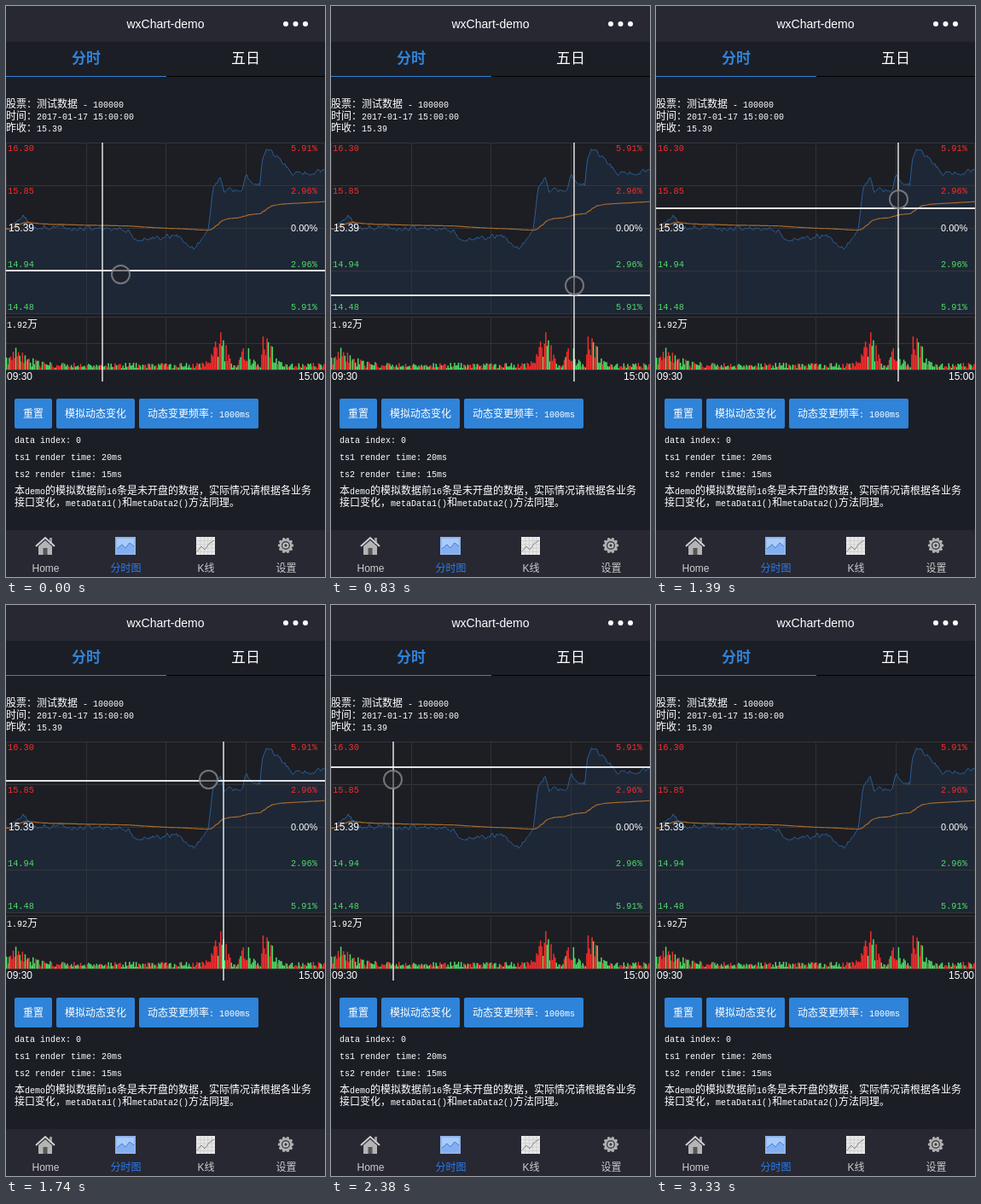
An HTML page with a canvas that plays this animation: 374 px wide and 669 px high, repeating every 3980 ms.

```html
<!DOCTYPE html>
<html lang="zh">
<head>
<meta charset="utf-8">
<title>wxChart-demo</title>
<style>
html, body { margin: 0; width: 374px; height: 669px; overflow: hidden; background: #1c1e26; }
canvas, div { position: absolute; left: 0; top: 0; }
#vert { top: 160px; width: 2px; height: 280px; background: rgba(255,255,255,.65); }
#horiz { width: 374px; height: 2px; background: rgba(255,255,255,.87); }
#touch { width: 19px; height: 19px; border: 2px solid rgba(150,150,150,.72); border-radius: 50%; background: rgba(30,32,40,.5); }
</style>
</head>
<body>
<canvas id="stage" width="374" height="669"></canvas>
<div id="vert"></div><div id="horiz"></div><div id="touch"></div>
<script>
const $ = id => document.getElementById(id);
const g = $('stage').getContext('2d');
const W = 374, BLUE = '#2f83d8', RED = '#f72c2c', GREEN = '#4fdc68', BAR = '#272832';
const SANS = '"Liberation Sans", "Noto Sans CJK SC", "Noto Sans CJK", sans-serif';
const CJK = '"Noto Sans CJK SC", "Noto Sans CJK", sans-serif';
const MONO = '"Liberation Mono", monospace';

let seed = 11;
const rnd = () => (seed = (seed * 16807) % 2147483647) / 2147483647;

// Linear interpolation in rows of [position, ...values].
function at(rows, p) {
  const i = rows.findIndex(r => r[0] >= p);
  if (i < 0) return rows[rows.length - 1].slice(1);
  if (!i) return rows[0].slice(1);
  const a = rows[i - 1], b = rows[i], k = (p - a[0]) / (b[0] - a[0]);
  return a.slice(1).map((v, j) => v + (b[j + 1] - v) * k);
}

function rect(x, y, w, h, color) {
  g.fillStyle = color;
  g.fillRect(x, y, w, h);
}

function text(s, x, y, font, color = '#fff', align = 'left') {
  g.font = font;
  g.fillStyle = color;
  g.textAlign = align;
  g.fillText(s, x, y);
}

// Full-width glyphs at 12px, half-width ones at 6px advance.
function mixed(s, x, y) {
  for (const run of s.match(/[\x20-\x7e]+|[^\x20-\x7e]+/g)) {
    const half = run < '\x7f';
    text(run, x, y, half ? '10px ' + MONO : '12px ' + CJK);
    x += run.length * (half ? 6 : 12);
  }
}

function path(points, color, width = 1) {
  g.beginPath();
  points.forEach(p => g.lineTo(...p));
  g.strokeStyle = color;
  g.lineWidth = width;
  g.stroke();
}

function shape(points, color) {
  g.beginPath();
  points.forEach(p => g.lineTo(...p));
  g.fillStyle = color;
  g.fill();
}

function disc(x, y, r, color) {
  g.beginPath();
  g.arc(x, y, r, 0, 7);
  g.fillStyle = color;
  g.fill();
}

function header() {
  rect(0, 0, W, 42, BAR);
  text('wxChart-demo', 187, 26, '14px ' + SANS, '#fff', 'center');
  for (let i = 0; i < 3; i++) disc(328 + i * 11.5, 21, 3, '#fff');
  text('分时', 94, 67, 'bold 17px ' + CJK, BLUE, 'center');
  text('五日', 281, 67, '17px ' + CJK, '#fff', 'center');
  rect(0, 82, 188, 1, BLUE);
  rect(188, 82, 186, 1, '#000');
  ['股票：测试数据 - 100000', '时间：2017-01-17 15:00:00', '昨收：15.39']
    .forEach((s, i) => mixed(s, 0, 119 + i * 14));
}

// Turning points of the price curve.
const PRICE = [
  [0, 264], [20, 248], [30, 258], [144, 262], [150, 274], [200, 269], [220, 286], [237, 262], [243, 213],
  [251, 201], [256, 217], [276, 216], [281, 201], [298, 209], [300, 180], [305, 166], [322, 179], [335, 196], [374, 193]
];
// Trading bursts: centre, spread, height.
const SURGES = [[8, 24, 19], [12, .7, 45], [250, 9, 44], [281, 7, 30], [303, 3, 56], [312, 7, 24]];

// One trade sample per 1.55px; the average is weighted by volume.
function trades() {
  const list = [];
  let drift = 0, money = 0, total = 0;
  for (let x = 0; x <= W; x += 1.55) {
    drift = drift * .6 + (rnd() - .5) * 5;
    const price = at(PRICE, x)[0] + drift;
    const surge = SURGES.reduce((sum, [c, w, h]) => sum + h * Math.exp(-(((x - c) / w) ** 2)), 8);
    const volume = Math.min(61, surge * (.2 + .8 * rnd()));
    money += price * volume;
    total += volume;
    list.push({ x, price, volume, mean: money / total });
  }
  return list;
}

function chart() {
  rect(0, 160, W, 200, '#1c1e23');
  rect(0, 365, W, 61, '#1c1e23');
  const data = trades();
  const line = data.map(d => [d.x, d.price]);
  shape([...line, [W, line[line.length - 1][1]], [W, 360], [0, 360]], '#1e2735');
  for (let i = 0; i < 5; i++) {
    rect(0, 160 + i * 50, W, 1, '#34353a');
    const x = Math.min(373, Math.round(i * 93.5));
    rect(x, 160, 1, 200, '#303238');
    rect(x, 365, 1, 61, '#303238');
  }
  for (const y of [364, 395, 426]) rect(0, y, W, 1, '#34353a');
  path(line, '#2b5d98');
  path(data.map(d => [d.x, d.mean]), '#a4692f', 1.2);
  data.forEach((d, i) => {
    const rising = i && d.price < data[i - 1].price;
    rect(d.x, 426 - d.volume, 1.5, d.volume, rising ? RED : GREEN);
  });

  const mono = '10.3px ' + MONO;
  [['16.30', '5.91%', 170, RED], ['15.85', '2.96%', 220, RED],
   ['14.94', '2.96%', 306, GREEN], ['14.48', '5.91%', 356, GREEN]].forEach(([a, b, y, color]) => {
    text(a, 2, y, mono, color);
    text(b, 334, y, mono, color);
  });
  text('15.39', 3, 264, '12px ' + SANS);
  text('0.00%', 334, 264, '11px ' + SANS);
  mixed('1.92万', 1, 377);
  text('09:30', 1, 438, '12px ' + SANS);
  text('15:00', 373, 438, '12px ' + SANS, '#fff', 'right');
}

function controls() {
  [[10, 44, '重置'], [59, 92, '模拟动态变化'], [156, 140, '动态变更频率: 1000ms']].forEach(([x, w, s]) => {
    g.beginPath();
    g.roundRect(x, 460, w, 35, 2);
    g.fillStyle = BLUE;
    g.fill();
    mixed(s, x + 10, 482);
  });
  ['data index: 0', 'ts1 render time: 20ms', 'ts2 render time: 15ms',
   '本demo的模拟数据前16条是未开盘的数据，实际情况请根据各业务']
    .forEach((s, i) => mixed(s, 10, 512 + i * 20));
  mixed('接口变化，metaData1()和metaData2()方法同理。', 10, 586);
}

function tabBar() {
  rect(0, 614, W, 55, BAR);
  ['Home', '分时图', 'K线', '设置'].forEach((s, i) =>
    text(s, 46.5 + i * 94, 662.5, '12px ' + SANS, i === 1 ? '#2a7cf0' : '#ccc', 'center'));

  // house
  rect(51, 623, 3, 7, '#999');
  shape([[38, 633], [46, 626], [54, 633], [54, 643], [38, 643]], '#b4b4b4');
  path([[35, 633], [46, 623], [57, 633]], '#d0d0d0', 2);
  rect(43.5, 635, 5, 8, '#555');

  // framed curve
  const wave = [[130, 636], [136, 631], [140, 635], [145, 629], [150, 633]];
  rect(128, 622, 24, 21, '#8fb4ec');
  rect(130, 624, 20, 17, '#a9cbf8');
  shape([...wave, [150, 641], [130, 641]], '#84aef0');
  path(wave, '#3f7fe0');

  // gridded plot
  rect(223, 622, 22, 21, '#e8e8e8');
  for (let i = 1; i < 5; i++) {
    rect(223 + i * 4.4, 622, 1, 21, '#cfcfcf');
    rect(223, 622 + i * 4.2, 22, 1, '#cfcfcf');
  }
  path([[224, 639], [229, 633], [233, 637], [238, 630], [244, 626]], '#888');

  // gear
  for (let i = 0; i < 10; i++) {
    const a = i * Math.PI / 5;
    disc(328 + 7.5 * Math.cos(a), 632 + 7.5 * Math.sin(a), 1.8, '#b0b0b0');
  }
  [[7.5, '#b0b0b0'], [5, '#3c3d44'], [3.6, '#c4c4c4'], [1.7, '#3c3d44']]
    .forEach(([r, color]) => disc(328, 632, r, color));
}

// Finger track: time, x, y. The crosshair trails it by one sample.
const LAG = 60;
const TRACK = [
  [-60, 113, 310], [0, 134, 314], [350, 272, 338], [530, 285, 341], [770, 285, 339], [1050, 285, 285],
  [1110, 285, 277], [1480, 284, 209], [1670, 255, 206], [1730, 237, 204], [2200, 85, 190], [2320, 73, 190],
  [2380, 72, 204], [2610, 73, 312], [2670, 71, 319], [2890, 71, 334], [3030, 71, 334], [3270, 71, 650]
];
const RELEASE = 3090, LEAVE = 3330, LOOP = 3980;

// Sampling bursts: start, end, count.
const BURSTS = [[60, 530, 9], [770, 1280, 10], [1330, 1850, 10], [1920, 2440, 10], [2500, 2890, 8], [RELEASE, LEAVE, 5]];
const samples = [0];
for (const [a, b, n] of BURSTS)
  for (let i = 0; i < n; i++) samples.push(Math.round((a + (b - a) * i / (n - 1)) / 10) * 10);

function place(id, x, y, visible) {
  const style = $(id).style;
  style.transform = `translate(${Math.round(x)}px,${Math.round(y)}px)`;
  style.visibility = visible ? 'visible' : 'hidden';
}

function frame() {
  const t = (performance.now() - start) % LOOP;
  const s = samples.filter(v => v <= t).pop();
  const [x, y] = at(TRACK, s);
  const [cx, cy] = at(TRACK, s - LAG);
  place('touch', x - 11, y - 11, s < LEAVE);
  place('vert', cx - 1, 0, s < RELEASE);
  place('horiz', 0, cy - 1, s < RELEASE);
  requestAnimationFrame(frame);
}

header();
chart();
controls();
tabBar();
const start = performance.now();
frame();
</script>
</body>
</html>
```
